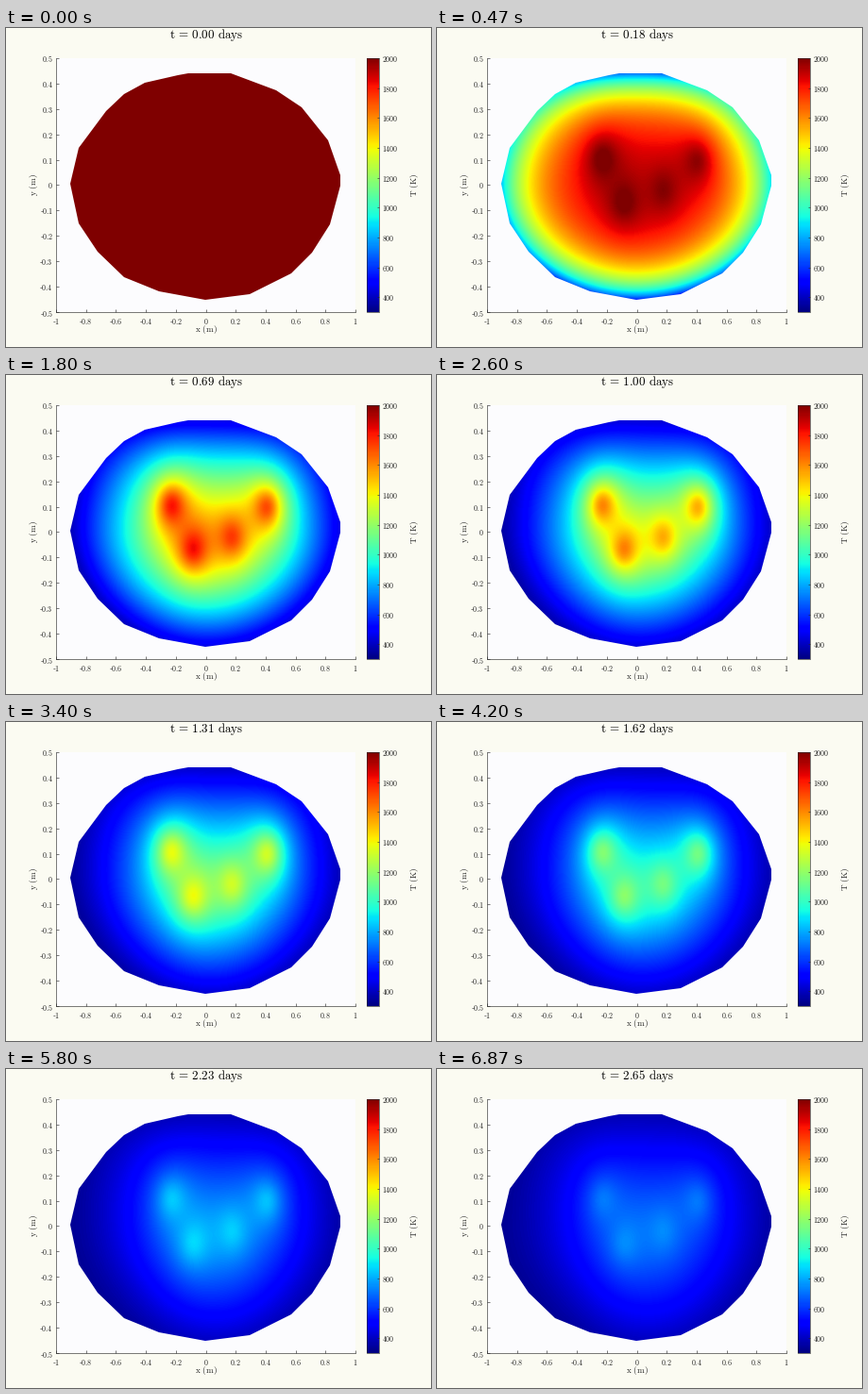
A matplotlib script that plays this animation: 450 by 338 pixels, repeating every 6.97 s.

```python
import numpy as np
import matplotlib.pyplot as plt
from matplotlib.animation import FuncAnimation
from matplotlib.patches import Polygon
from matplotlib.ticker import FuncFormatter, MultipleLocator

W, H, DPI = 450, 338, 100
PX = 72 / DPI                      # points per pixel
LOOP, FRAMES = 6970, 205
TICK = LOOP // FRAMES              # 34 ms
STEP_MS, LAST = 200 / 3, 103
INK = "#262626"

plt.rcParams.update({
    "font.family": "DejaVu Serif",
    "mathtext.fontset": "cm",
    "axes.edgecolor": INK,
    "axes.linewidth": 0.6 * PX,
})

# Corners of the body, in stage pixels
OUTLINE = [
    (193, 48), (238, 48), (286, 66), (313, 84), (341, 119), (354, 156),
    (354, 167), (343, 208), (324, 238), (302, 260), (258, 282), (211, 288),
    (162, 279), (125, 264), (97, 237), (77, 207), (68, 165), (77, 127),
    (106, 88), (125, 70), (147, 58), (182, 50),
]
# Slow-cooling spots: x, y, strength
SPOTS = [(175, 137, 1), (277, 139, 1), (198, 185, 0.85), (240, 172, 0.7)]

LEFT, RIGHT, TOP, BOTTOM = 53, 370, 32, 301
X, Y = np.meshgrid(np.linspace(LEFT + 1, RIGHT - 1, 159),
                   np.linspace(TOP + 1, BOTTOM - 1, 135))
RIM = ((X - 211) / 143) ** 2 + ((Y - 168) / 120) ** 2


def spot(x, y):
    """Peaked bump with a long tail, 1 at its centre."""
    d2 = ((X - x) / 12) ** 2 + ((Y - y) / 18) ** 2
    return np.exp(1 - np.sqrt(1 + d2))


SPOT_SHAPE = 1 - np.prod([1 - s * spot(x, y) for x, y, s in SPOTS], axis=0)


def temperature(day):
    # Hot core: drifts right and down, grows taller and narrows below
    v = (Y - 166 - 2.6 * day) / (120 + 25 * day)
    u = (X - 211 - 6 * day) / ((155 + 5 * day) * (1 - 0.11 * day * v))
    m = 2 + 1.2 * np.sqrt(day) * np.clip(-v, 0, 1)
    r = (np.abs(u) ** m + np.abs(v) ** m) ** (1 / m)
    sharp = 2 + 6 * np.exp(-day / 0.12)
    core = np.clip(1 - r ** sharp, 0, 1) ** (1.7 * np.sqrt(day))

    floor = 100 * (1 - np.exp(-3 * day))
    x = day / 0.82
    contrast = 660 * (x * np.exp(1 - x)) ** 1.4
    temp = (300 + floor * (1 - 0.7 * RIM)
            + (150 + 1620 * np.exp(-1.08 * day)) * core
            + contrast * SPOT_SHAPE)
    return np.clip(temp, 300, 2000)


def tex(s):
    s = s.replace(" = ", r"\hspace{0.18}=\hspace{0.18}")
    return r"$\mathrm{" + s.replace(" ", r"\hspace{0.38}") + "}$"


def number(v, _=None):
    v = round(v, 1)
    return ("-" if v < 0 else "") + tex(f"{abs(v):g}")


def box(x0, x1):
    return [x0 / W, 1 - BOTTOM / H, (x1 - x0) / W, (BOTTOM - TOP) / H]


def label(x, y, s, size, **kw):
    return fig.text(x / W, 1 - y / H, tex(s), size=size * PX, ha="center", **kw)


def style_ticks(axes, length, pad):
    axes.tick_params(direction="in", length=length * PX, width=0.6 * PX,
                     color=INK, labelcolor=INK, labelsize=8 * PX, pad=pad * PX)


fig = plt.figure(figsize=(W / DPI, H / DPI), dpi=DPI, facecolor="#fbfbf2")

ax = fig.add_axes(box(LEFT, RIGHT), facecolor="#fcfcfe")
ax.set(xlim=(-1, 1), ylim=(-0.5, 0.5))
ax.spines[["top", "right"]].set_visible(False)
for axis, gap in ((ax.xaxis, 0.2), (ax.yaxis, 0.1)):
    axis.set_major_locator(MultipleLocator(gap))
    axis.set_major_formatter(FuncFormatter(number))
style_ticks(ax, 3, 3)
ax.tick_params(axis="x", pad=5.5 * PX)

field = ax.imshow(temperature(0), cmap="jet", vmin=300, vmax=2000,
                  extent=(-1, 1, -0.5, 0.5), aspect="auto",
                  interpolation="bilinear")
corners = [(2 * (x - LEFT) / (RIGHT - LEFT) - 1,
            0.5 - (y - TOP) / (BOTTOM - TOP)) for x, y in OUTLINE]
field.set_clip_path(Polygon(corners, transform=ax.transData))

bar = fig.colorbar(field, cax=fig.add_axes(box(382, 395)))
bar.set_ticks(range(400, 2001, 200))
bar.ax.yaxis.set_major_formatter(FuncFormatter(number))
style_ticks(bar.ax, 2, 3)
bar.outline.set(linewidth=0.6 * PX, edgecolor=INK)

label(211.5, 322.5, "x (m)", 9.2, color=INK)
label(29.5, 166.5, "y (m)", 9.2, color=INK, rotation=90, va="center")
label(432.5, 166.5, "T (K)", 9.2, color=INK, rotation=90, va="center")
title = label(212, 10.5, "t = 0.00 days", 13, color="black")


def update(i):
    step = min(LAST, int((i * TICK + TICK - 1) / STEP_MS))
    day = max(0, 0.0257 * step - 0.001)
    field.set_data(temperature(day))
    title.set_text(tex(f"t = {day:.2f} days"))
    return field, title


anim = FuncAnimation(fig, update, frames=FRAMES, interval=TICK,
                     init_func=lambda: update(0), repeat=True, repeat_delay=0)
plt.show()
```
